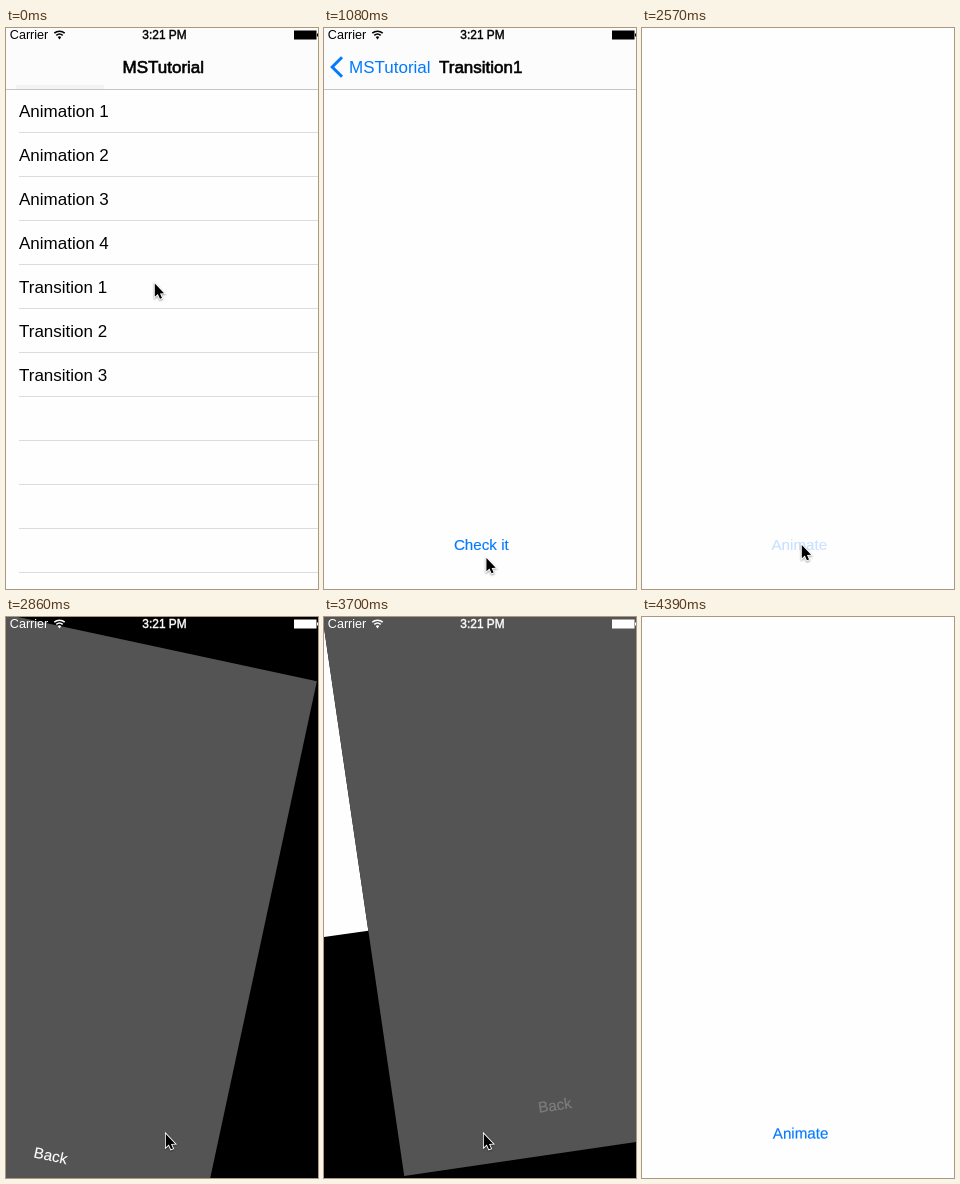
An HTML page with a canvas that plays this animation: 312 by 561 pixels, repeating every 4.64 s.

```html
<!DOCTYPE html>
<html lang="en">
<head>
<meta charset="utf-8">
<title>View transitions</title>
<style>
  html, body { margin: 0; width: 100%; height: 100%; overflow: hidden; background: #fefefe; }
  canvas { display: block; }
</style>
</head>
<body>
<canvas id="stage" width="312" height="561"></canvas>
<script>
const ctx = document.getElementById('stage').getContext('2d');
const LOOP = 4640, W = 320, H = 568;
const BLUE = '#007aff', PAPER = '#fefefe', BAR = '#fcfcfc';
const PUSH = 354, MODAL = 1500, PRESENT = 2683, DISMISS = 3674;
const ROWS = ['Animation 1', 'Animation 2', 'Animation 3', 'Animation 4',
              'Transition 1', 'Transition 2', 'Transition 3'];

// Pointer positions: time, x, y
const POINTER = [
  [0, 148, 254], [390, 148, 254], [560, 225, 268], [850, 161, 530], [1060, 161, 530],
  [1160, 164, 523], [1290, 164, 523], [1330, 167, 516], [2270, 167, 516],
  [2390, 159, 515.5], [4190, 159, 515.5], [4390, 268, 580], [LOOP, 268, 580]
];

const clamp = v => Math.max(0, Math.min(1, v));
const ramp = (t, start, length) => clamp((t - start) / length);
const mix = (a, b, p) => a + (b - a) * p;

// Critically damped slide used by pushes and modals
function slide(ms) {
  const u = Math.max(0, ms) * 0.0183;
  return 1 - (1 + u) * Math.exp(-u);
}

// Underdamped spring, damping ratio 0.5
function spring(ms) {
  const s = Math.max(0, ms) / 1000;
  return 1 - Math.exp(-8.66 * s) * (Math.cos(15 * s) + 0.577 * Math.sin(15 * s));
}

function rect(x, y, w, h, color) {
  ctx.fillStyle = color;
  ctx.fillRect(x, y, w, h);
}

function path(points, closed) {
  ctx.beginPath();
  points.forEach(([x, y]) => ctx.lineTo(x, y));
  if (closed) ctx.closePath();
}

function text(str, x, y, { size = 17, color = '#000', alpha = 1, align = 'left', heavy = 0 } = {}) {
  if (alpha <= 0) return;
  ctx.globalAlpha = alpha;
  ctx.font = `${size}px "Liberation Sans", Arial, sans-serif`;
  ctx.textAlign = align;
  ctx.fillStyle = ctx.strokeStyle = color;
  ctx.fillText(str, x, y);
  if (heavy) {
    ctx.lineWidth = heavy;
    ctx.strokeText(str, x, y);
  }
  ctx.globalAlpha = 1;
}

function button(label, color, alpha) {
  text(label, 159.3, 525, { size: 15.2, color, alpha, align: 'center', heavy: 0.15 });
}

function at(x, y, angle, draw) {
  ctx.save();
  ctx.translate(x, y);
  ctx.rotate(angle * Math.PI / 180);
  draw();
  ctx.restore();
}

function list(t) {
  rect(0, 0, W, H, PAPER);
  if (t >= 320) rect(0, 240, W, 44, '#d9d9d9');
  for (let i = 0; i < 11; i++) rect(15, 107 + 44 * i, W, 1, '#dcdcdc');
  ROWS.forEach((row, i) => text(row, 15, 92 + 44 * i));
}

function navBar(t, p) {
  rect(0, 0, W, 64, BAR);
  if (p === 0) rect(12, 60, 88, 4, '#f3f3f3');
  else if (p < 0.998) {
    // The dimmed list shows through the translucent bar
    rect(0, 0, W * (1 - p) + 17, 64, `rgba(0,0,0,${0.025 * p})`);
  }
  rect(0, 64, W, 1, '#c6c6c6');
  const backX = mix(118.5, 27, p);
  text('MSTutorial', backX, 48, { alpha: 1 - 2 * p, heavy: 0.6 });
  text('MSTutorial', backX, 48, { color: BLUE, alpha: p });
  text('Transition1', mix(347, 117, p), 48, { alpha: p, heavy: 0.6 });
  ctx.globalAlpha = ramp(t, 530, 250);
  ctx.strokeStyle = BLUE;
  ctx.lineWidth = 3;
  path([[20, 32.3], [10.2, 42], [20, 51.7]]);
  ctx.stroke();
  ctx.globalAlpha = 1;
}

function navigation(t) {
  const p = slide(t - PUSH), edge = W * (1 - p);
  if (p < 0.9999) at(-96 * p, 0, 0, () => list(t));
  if (p > 0) {
    rect(0, 0, edge, H, `rgba(0,0,0,${0.1 * p})`);
    rect(edge - 5, 0, 5, H, 'rgba(0,0,0,0.02)');
    at(edge, 0, 0, () => {
      rect(0, 0, W, H, PAPER);
      button('Check it', BLUE, t < 1470 ? 1 : 0.2);
    });
  }
  navBar(t, p);
}

function whitePage(t) {
  rect(0, 0, W, H, PAPER);
  button('Animate', BLUE, t < 2570 ? 1 : mix(0.2, 1, ramp(t, 2690, 300)));
}

function greyPage(t) {
  rect(0, 0, W, H, '#545454');
  button('Back', '#fff', t < 3550 ? 1 : mix(0.2, 1, ramp(t, 3690, 300)));
}

// Both pages hang on the top left corner, a quarter turn apart
function wheel(t) {
  const angle = 90 * (spring(t - PRESENT) - spring(t - DISMISS));
  rect(-10, -10, W + 20, H + 20, '#000');
  at(0, 0, angle, () => whitePage(t));
  at(0, 0, angle - 90, () => greyPage(t));
}

function statusBar(color, alpha) {
  if (alpha <= 0) return;
  text('Carrier', 3.8, 11.3, { size: 12.6, color, alpha });
  text('3:21 PM', 158.5, 11.3, { size: 11.9, color, alpha, align: 'center', heavy: 0.4 });
  ctx.globalAlpha = alpha;
  ctx.strokeStyle = color;
  ctx.lineWidth = 1.6;
  for (const r of [4.8, 7.8]) {
    ctx.beginPath();
    ctx.arc(53.5, 11, r, -2.3, -0.84);
    ctx.stroke();
  }
  ctx.fillStyle = color;
  ctx.beginPath();
  ctx.moveTo(53.5, 11.5);
  ctx.arc(53.5, 11, 2.6, -2.3, -0.84);
  ctx.fill();
  rect(288, 2.5, 22.5, 9, color);
  rect(311, 5.5, 1, 3, color);
  ctx.globalAlpha = 1;
}

function pointer(t) {
  const i = POINTER.findIndex(k => k[0] > t);
  const [t0, x0, y0] = POINTER[i - 1], [t1, x1, y1] = POINTER[i];
  const p = (t - t0) / (t1 - t0);
  at(mix(x0, x1, p) + 0.8, mix(y0, y1, p) + 1.5, 0, () => {
    ctx.scale(0.86, 0.86);
    path([[0, 0], [0, 15.5], [3.5, 12.3], [6, 17.8], [8.4, 16.8], [6, 11.5], [10.8, 11.3]], true);
    ctx.shadowColor = 'rgba(0,0,0,0.4)';
    ctx.shadowBlur = 2;
    ctx.shadowOffsetY = 1;
    ctx.strokeStyle = '#fff';
    ctx.lineWidth = 2;
    ctx.stroke();
    ctx.shadowColor = 'transparent';
    ctx.fillStyle = '#000';
    ctx.fill();
  });
}

function draw(t) {
  // The visible stage is a crop of the 320 by 568 screen
  at(-2, -3, 0, () => {
    if (t >= PRESENT) return wheel(t);
    navigation(t);
    if (t > MODAL) at(0, H * (1 - slide(t - MODAL)), 0, () => whitePage(t));
  });
  if (t < PRESENT) statusBar('#000', 1 - ramp(t, 1480, 290));
  else statusBar('#fff', ramp(t, 2690, 160) - ramp(t, 3700, 300));
  pointer(t);
}

function tick() {
  draw(performance.now() % LOOP);
  requestAnimationFrame(tick);
}
tick();
</script>
</body>
</html>
```
